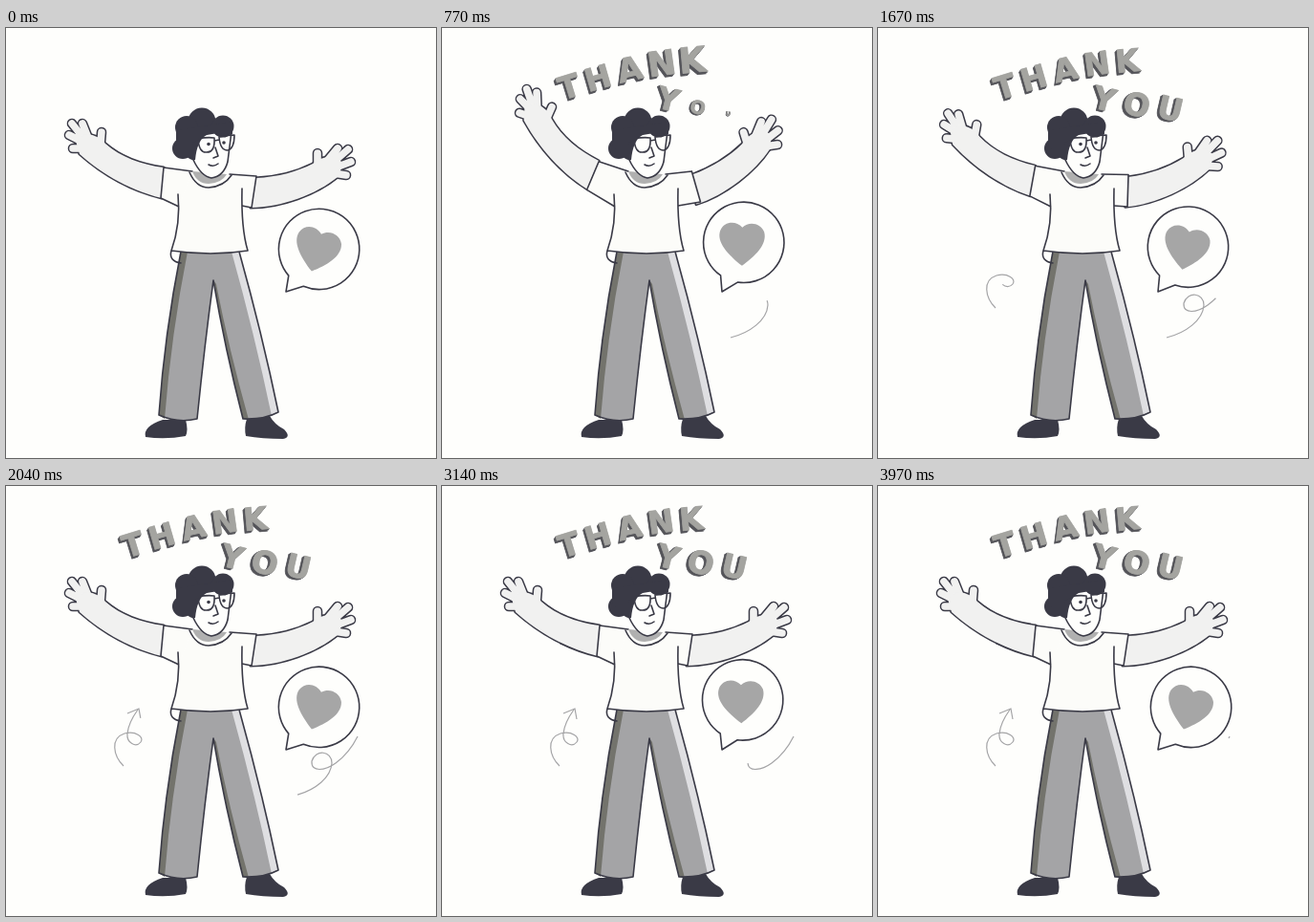
An HTML page for the animation above (4 s loop, 450 by 450 pixels).

```html
<!DOCTYPE html>
<html lang="en">
<head>
<meta charset="utf-8">
<title>Thank you</title>
<style>
  html, body { margin: 0; width: 100%; height: 100%; overflow: hidden; background: #fefefc; }
  svg { display: block; width: 100vw; height: 100vh; }
  .ln { fill: none; stroke: #3a3a46; stroke-width: 1.6; stroke-linecap: round; stroke-linejoin: round; }
  .shirt { fill: #fcfcf9; }
  .dark { fill: #3a3a46; }
  .thin { fill: none; stroke: #a4a4a6; stroke-width: 1.2; }
  .skin { fill: #f1f1f0; stroke: none; }
  .edge { fill: #3a3a46; stroke: #3a3a46; stroke-width: 3; stroke-linejoin: round; }
  .finger { fill: none; stroke: #f1f1f0; stroke-width: 7.6; stroke-linecap: round; }
  .finger.rim { stroke: #3a3a46; stroke-width: 10.6; }
  text { font: 700 33px "DejaVu Sans", sans-serif; text-anchor: middle; stroke-width: .8; stroke-linejoin: round; }
</style>
</head>
<body>
<svg viewBox="0 0 450 450">
  <defs>
    <path id="armL" d="M165 146C142 143 120 135 104 121C99 114 90 111 82 111L73 118L77 132C95 148 125 169 163 178Z"/>
    <path id="handL" d="M82 126L70 126M80 119L66 112M81 115L69 100M86 115L80 100M99 121L100 109"/>
    <path id="armR" d="M261 157C285 156 305 150 321 142C328 136 338 134 345 134L353 142L347 156C325 174 288 188 256 188Z"/>
    <path id="handR" d="M343 152L356 154M345 146L361 140M343 140L358 127M337 138L347 126M326 143L326 131"/>
  </defs>

  <!-- legs -->
  <path class="dark" d="M164 410L188 410Q191 421 188 427Q167 431 146 428Q143 417 164 410ZM252 409L276 406Q281 415 291 420Q299 428 290 430Q268 430 251 427Q249 418 252 409Z"/>
  <path fill="#a4a4a6" d="M183 234L244 234Q268 320 285 402Q270 410 248 409Q229 335 217 264Q208 330 200 409Q180 414 160 405Q166 320 183 234Z"/>
  <path fill="#73736c" d="M183 234L190 234Q173 320 166 409L160 405Q166 320 183 234ZM217 264L220 268Q233 335 254 410L248 409Q229 335 217 264Z"/>
  <path fill="#dfdfe2" d="M236 234L244 234Q268 320 285 402L278 406Q260 320 236 234Z"/>
  <path class="ln" d="M183 234Q166 320 160 405Q180 414 200 409Q208 330 217 264Q229 335 248 409Q270 410 285 402Q268 320 244 234"/>

  <!-- arms -->
  <g id="left">
    <use href="#handL" class="finger rim"/><use href="#armL" class="edge"/>
    <use href="#handL" class="finger"/><use href="#armL" class="skin"/>
  </g>
  <g id="right">
    <use href="#handR" class="finger rim"/><use href="#armR" class="edge"/>
    <use href="#handR" class="finger"/><use href="#armR" class="skin"/>
  </g>

  <!-- shirt -->
  <path id="sleeveL" class="ln shirt"/>
  <path id="sleeveR" class="ln shirt"/>
  <path class="shirt" d="M194 153L236 155L247 186Q246 210 253 233Q215 239 173 233Q181 205 181 187Z"/>
  <path class="ln" d="M180 174Q183 205 173 233Q170 244 183 246M173 233Q215 239 253 233Q246 210 247 168"/>
  <path fill="#b0b0b0" d="M195 150Q200 163 212 163Q226 162 231 153Z"/>
  <path class="ln" d="M192 151Q199 167 212 167Q228 166 236 154"/>

  <!-- head -->
  <path class="ln" style="fill:#fefefc" d="M194 120L196 138Q204 155 215 157Q228 155 232 140L236 108L205 104Z"/>
  <g class="dark">
    <circle cx="205" cy="98" r="14.5"/><circle cx="189" cy="104" r="12"/>
    <circle cx="227" cy="103" r="11.5"/><circle cx="185" cy="126" r="11"/>
    <path d="M178 107L236 98L237 111Q222 109 210 112Q200 117 198 138Q191 140 178 122Z"/>
  </g>
  <g id="eyes" class="dark"><circle cx="212" cy="121.5" r="1.8"/><circle cx="228" cy="120" r="1.8"/></g>
  <path class="ln" d="M195 121L201 118M201 116Q210 114 218 115Q219 130 210 130Q202 131 201 116ZM223 114Q231 112 239 112Q239 126 232 128Q224 128 223 114ZM218 118L223 117M219 125L222 134L217 136M212 143Q217 146 222 142"/>

  <!-- bubble and flourishes -->
  <g id="bubble">
    <path class="ln" style="fill:#fefefc" d="M309 265.5A42.2 42.2 0 1 0 291 259L293 276Z"/>
    <path fill="#a6a6a6" d="M313 248C298 237 285 224 289 212C293 202 305 201 312 208C319 201 331 203 335 212C339 225 326 238 313 248Z"/>
  </g>
  <path id="swirl" class="thin" pathLength="1" d="M302 324C322 319 340 306 341 290C341 277 324 275 320 288C319 300 334 298 345 290C356 282 363 272 368 262"/>
  <path id="stem" class="thin" pathLength="1" d="M123 293C112 282 109 264 124 259C136 256 145 263 141 268C136 274 126 269 127 259C128 249 133 241 138 234"/>
  <path id="tip" class="thin" pathLength="1" d="M127 238L139 233L141 244"/>
  <g id="words"></g>
</svg>
<script>
const LOOP = 4000;
const $ = id => document.getElementById(id);
const clamp = v => Math.max(0, Math.min(1, v));
const smooth = v => (v = clamp(v)) * v * (3 - 2 * v);

// character, centre x, centre y, tilt
const letters = [
  ["T", 133, 61, -17], ["H", 163, 52, -16], ["A", 196, 43, -13], ["N", 229, 37, -8], ["K", 261, 34, -5],
  ["Y", 237, 74, 14], ["O", 271, 80, 12], ["U", 306, 84, 13]
].map(([ch, x, y, tilt]) => {
  const g = document.createElementNS("http://www.w3.org/2000/svg", "g");
  const layer = (k, color) =>
    `<text x="${-k * .8}" y="${12 + k * .7}" fill="${color}" stroke="${color}">${ch}</text>`;
  g.innerHTML = [3, 2, 1].map(k => layer(k, "#55555a")).join("") + layer(0, "#a4a4a0");
  $("words").append(g);
  return { g, x, y, tilt };
});

function turn([x, y], [cx, cy], deg) {
  const a = deg * Math.PI / 180, c = Math.cos(a), s = Math.sin(a);
  x -= cx; y -= cy;
  return [cx + x * c - y * s, cy + x * s + y * c];
}

function trim(id, from, to) {
  const el = $(id);
  el.style.display = to - from > .002 ? "" : "none";
  el.setAttribute("stroke-dasharray", `0 ${from} ${to - from} 2`);
}

// the cuff follows the arm, the seam stays on the torso
function arm(name, sleeve, pivot, armTurn, cuffTurn, seam, cuff) {
  $(name).setAttribute("transform", `rotate(${armTurn} ${pivot})`);
  const [a, b] = cuff.map(p => turn(p, pivot, cuffTurn));
  $(sleeve).setAttribute("d", `M${seam[0]}L${a}L${b}L${seam[1]}`);
}

// grows past full size, then settles
function pop(t) {
  return t < 370 ? 1.12 * smooth(t / 370) : 1.12 - .12 * smooth((t - 370) / 300);
}

function draw(t) {
  const wave = (1 - Math.cos(t / 1000 * Math.PI)) / 2;
  const lift = t < 2000 ? wave : 0;
  arm("left", "sleeveL", [185, 140], 22 * lift, 20 * lift, [[195, 150], [181, 187]], [[165, 146], [162, 178]]);
  arm("right", "sleeveR", [250, 154], -20 * lift, -28 * lift, [[234, 153], [247, 186]], [[262, 155], [257, 188]]);

  $("bubble").setAttribute("transform", `rotate(${16 * (1 - wave)} 293 276)`);
  trim("swirl", clamp(t / 2000 - 1), clamp(t / 2000));
  trim("stem", 0, clamp((t - 1000) / 1000));
  trim("tip", 0, clamp((t - 1850) / 200));

  const blink = Math.max(...[770, 3140].map(m => 1 - smooth(Math.abs(t - m) / 110)));
  $("eyes").setAttribute("transform", `translate(0 121) scale(1 ${1 - blink}) translate(0 -121)`);

  letters.forEach(({ g, x, y, tilt }, i) => {
    const s = pop(t - 10 - i * 95);
    g.style.display = s > .01 ? "" : "none";
    g.setAttribute("transform", `translate(${x - 8} ${y + 7}) scale(${s}) translate(8 -7) rotate(${tilt})`);
  });
}

function frame() {
  draw(performance.now() % LOOP);
  requestAnimationFrame(frame);
}
frame();
</script>
</body>
</html>
```
